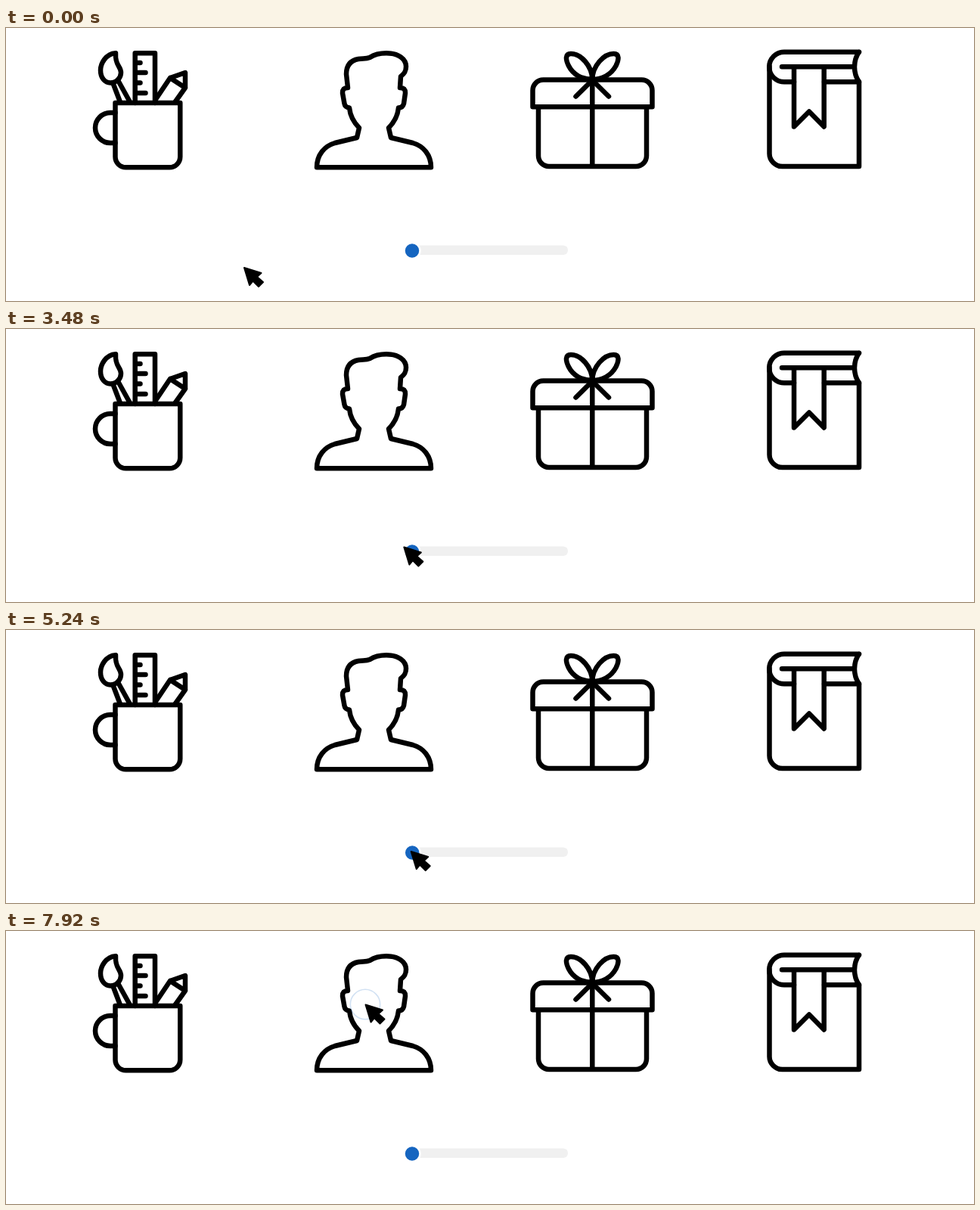
Recreate the animation shown at these times as an HTML page. Size 1280 by 361 pixels, loop 8000 ms.

```html
<!DOCTYPE html>
<html lang="en">
<head>
<meta charset="utf-8">
<title>Stroke width slider</title>
<style>
  html, body { margin: 0; width: 100%; height: 100%; overflow: hidden; background: #fff; }
  svg { display: block; width: 100%; height: 100%; }
  .icon { fill: none; stroke: #000; stroke-width: 6.5; stroke-linecap: round; stroke-linejoin: round; }
</style>
</head>
<body>
<svg viewBox="0 0 1280 361">
  <g id="mug" class="icon">
    <path d="M144.5 99H230.3V170.3a14 14 0 0 1-14 14H158.5a14 14 0 0 1-14-14Z"/>
    <path d="M144.5 112H138a20 20 0 0 0 0 40H144.5"/>
    <path d="M170.7 99V33.2H197V99M171 46H177.5M171 59H184.5M171 72.5H177.5M171 86H184.5"/>
    <path d="M145 33.2C132 34 125 47 125 56C125 66 131 72.5 138 72.5C146 72.5 152 66 152 59C152 50 144 50 145 33.2Z"/>
    <path d="M141.5 73L151 98M148.5 70L164 98"/>
    <path d="M197.5 95L217 66L237 59V79L223.5 98M217 66L237 79"/>
  </g>
  <g class="icon">
    <path d="M411 184.3C411 168 421 156 435 152L464 145L467 132C459 124 455 115 454 105.5C450 105 448 103 447.500 100L445 86C445 81 447 79 452 79L450 61C450 50 455 43 466 41C472 40 476 41 481 39C487 35 494 33.300 503 33.300C519 33.300 529 41 529 51C529 58 526 61 522 64L521 79C526 79 528 81 528 86L526 100C525 104 523 105.500 519 105.500C518 115 515 123 506 132L509 145L538 152C552 156 562 168 562 184.300Z"/>
  </g>
  <g class="icon">
    <path d="M696.5 104.300V82.500a14 14 0 0 1 14-14H840.500a14 14 0 0 1 14 14V104.300Z"/>
    <path d="M704 104.300V169a14 14 0 0 0 14 14H833a14 14 0 0 0 14-14V104.300M775.300 68.500V183"/>
    <path d="M775.300 68C775 50 760 34 747 34C739 34 740 42 744 50C750 62 762 68 775.300 68C788 68 800 62 806.500 50C810.500 42 811.500 34 803.500 34C790.500 34 775.600 50 775.300 68"/>
    <path d="M753.500 90.500L775.300 69L797 90.500"/>
  </g>
  <g class="icon">
    <path d="M1128 31.700H1029a19.800 19.800 0 0 0 0 39.600H1042M1082 71.300H1128C1120 60 1120 43 1128 31.700M1026 51.300H1121"/>
    <path d="M1009.500 51V165.500a17 17 0 0 0 17 17.500H1128V71.300"/>
    <path d="M1042 51.300V130.500L1062 110.500L1081.700 130.500V51.300"/>
  </g>
  <rect x="533" y="287.5" width="210" height="12.5" rx="6" fill="#f0f0f0"/>
  <rect id="fill" x="533" y="288.5" height="12" rx="4.500" fill="#1565c0"/>
  <circle id="knob" cy="294.5" r="10.500" fill="#1565c0" stroke="#fff" stroke-width="2.500"/>
  <circle id="ring" fill="none" stroke="#1565c0"/>
  <path id="cursor" d="M1 1L23.500 8L18 13L26 20L20 26L12.500 18.500L8 24Z" stroke="#000" stroke-width="2" stroke-linejoin="round"/>
</svg>
<script>
const LOOP = 8000, STEP = 80;
const MIN_X = 537, MAX_X = 733.5, GRIP = 2.5;
const [mug, fill, knob, ring, cursor] =
  ['mug', 'fill', 'knob', 'ring', 'cursor'].map(id => document.getElementById(id));

const clamp = v => Math.min(1, Math.max(0, v));
const set = (el, attrs) => { for (const k in attrs) el.setAttribute(k, attrs[k]); };

// cubic-bezier(.25, .1, .25, 1), solved by bisection
function ease(x) {
  if (x <= 0 || x >= 1) return clamp(x);
  let lo = 0, hi = 1;
  for (let i = 0; i < 24; i++) {
    const s = (lo + hi) / 2;
    if (.75 * s * (1 - s) + s ** 3 < x) lo = s; else hi = s;
  }
  return .3 * lo * (1 - lo) ** 2 + 3 * lo * lo * (1 - lo) + lo ** 3;
}
const tween = (t, start, duration) => ease((t - start) / duration);

const moves = [
  { start: 1245, to: [189, 125] },
  { start: 2842, to: [MIN_X - GRIP, 292] },
  { start: 6562, to: [474.5, 96.5] }
];
const clicks = [
  { start: 2075, at: [189.5, 125.5] },
  { start: 7415, at: [475, 97] }
];

function drawRing(t) {
  const click = clicks.find(c => t > c.start && t < c.start + 560);
  ring.style.display = click ? '' : 'none';
  if (!click) return;
  const p = (t - click.start) / 560;
  const fade = Math.min(1, 2 * (1 - p));
  const outer = 20.5 * (1 - (1 - p) ** 3);
  const width = Math.min(1 + 3 * fade, outer);
  set(ring, {
    cx: click.at[0], cy: click.at[1], r: outer - width / 2,
    'stroke-width': width, opacity: fade
  });
}

function draw(t) {
  const slide = tween(t, 3655, 775) - tween(t, 4431, 805);
  const knobX = MIN_X + (MAX_X - MIN_X) * slide;
  let x = 314, y = 316;
  for (const { start, to } of moves) {
    const p = tween(t, start, 755);
    x += (to[0] - x) * p;
    y += (to[1] - y) * p;
  }
  set(cursor, { transform: `translate(${x + knobX - MIN_X} ${y})` });
  set(knob, { cx: knobX });
  set(fill, { width: knobX - 533 });
  mug.style.strokeWidth = 6.5 - 3.1 * slide;
  drawRing(t);
}

const origin = performance.now();
function tick() {
  const t = (performance.now() - origin) % LOOP;
  draw(Math.floor(t / STEP) * STEP);
  requestAnimationFrame(tick);
}
tick();
</script>
</body>
</html>
```
